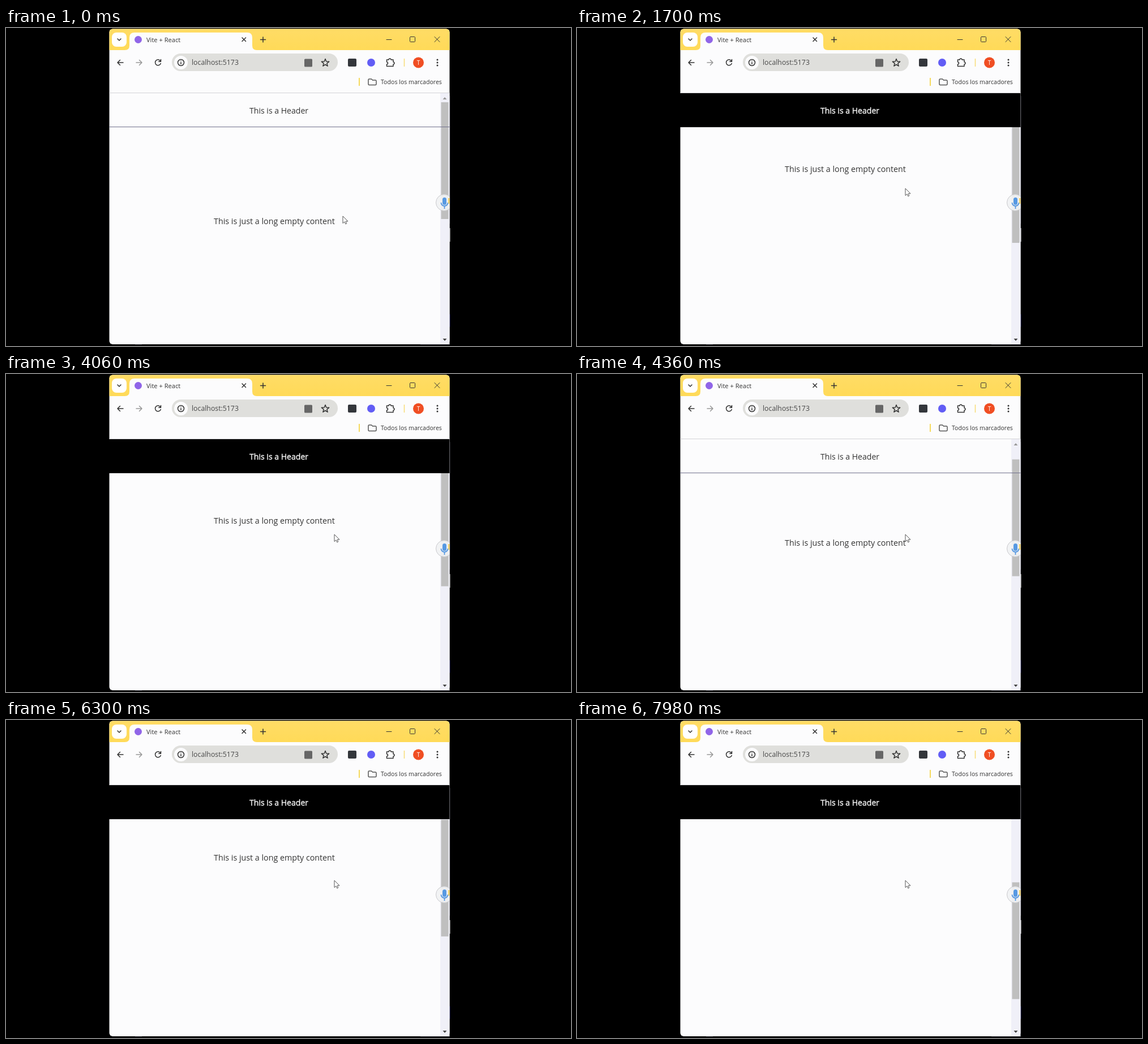
An HTML page for the animation above (8 s loop, 998 by 561 pixels).

```html
<!DOCTYPE html>
<html lang="es">
<head>
<meta charset="utf-8">
<title>Header on scroll</title>
<style>
  html, body { margin: 0; width: 100%; height: 100%; overflow: hidden; background: #000; }
  svg { display: block; width: 100%; height: 100%; }
  text { font-family: "Open Sans", "Noto Sans", sans-serif; fill: #333; }
  .line { fill: none; stroke: #333; stroke-width: 1.5; stroke-linecap: round; stroke-linejoin: round; }
  .thin { stroke-width: 1; }
</style>
</head>
<body>
<svg viewBox="0 0 998 561">
  <defs>
    <linearGradient id="bar" x2="0" y2="1">
      <stop stop-color="#ffdc66"/><stop offset="1" stop-color="#ffda58"/>
    </linearGradient>
    <clipPath id="window"><rect x="182.5" y="1.5" width="601" height="556.5" rx="6"/></clipPath>
    <clipPath id="page"><rect x="182" y="115" width="601.5" height="443"/></clipPath>
  </defs>
  <rect width="998" height="561"/>

  <!-- desktop showing past the window edge -->
  <path d="M784 353v24" stroke="#aaa" stroke-width="1.5"/>
  <path d="M784 120v225M228 558.8h12M732 558.8h52" stroke="#34343c"/>
  <path d="M784 505v22" stroke="#25256a"/>

  <g clip-path="url(#window)">
    <rect x="182" y="1" width="602" height="558" fill="#fcfcfd"/>
    <rect x="182" y="1" width="602" height="38" fill="url(#bar)"/>

    <!-- tab strip -->
    <rect x="187" y="8" width="26" height="25" rx="8" fill="#fff"/>
    <path class="line" d="M197 19l3 3 3-3"/>
    <path d="M210 39q8 0 8-8V17q0-9 9-9h199q9 0 9 9v14q0 8 8 8z" fill="#fcfcfd"/>
    <circle cx="233.500" cy="20.500" r="6.500" fill="#9065e8"/>
    <text x="248" y="25" font-size="11.1">Vite + React</text>
    <path class="line" d="M417 17l6.500 6.500m0-6.500l-6.500 6.500M449.500 20.500h9m-4.500-4.500v9"/>
    <path class="line thin" d="M672 20.500h9M757 15.500l9 9m0-9l-9 9" />
    <rect class="line thin" x="713.500" y="15.500" width="9" height="9" rx="1"/>

    <!-- toolbar -->
    <path class="line" d="M207 61h-10m4.500-4.500L197 61l4.500 4.500"/>
    <path class="line" d="M230 61h10m-4.500-4.500L240 61l-4.500 4.500" style="stroke:#999"/>
    <path class="line" d="M273 58.500a5 5 0 1 0 .3 4M273.500 55.500v3.700h-3.700"/>
    <rect x="293" y="45" width="293" height="31" rx="15.500" fill="#dfdfdc"/>
    <circle cx="309" cy="61" r="12" fill="#fcfcfd"/>
    <circle class="line" cx="309" cy="61" r="5.500"/>
    <path class="line" d="M309 60.500v3M309 58v.1"/>
    <text x="328" y="65.300" font-size="12.3" style="fill:#484848">localhost:5173</text>
    <rect x="527" y="54.500" width="14" height="14" rx="1.500" fill="#666"/>
    <path id="star" class="line"/>
    <rect x="604" y="54" width="15" height="14" rx="2" fill="#33363b"/>
    <circle cx="645" cy="61" r="7" fill="#625df5"/>
    <path class="line" d="M672.500 56h3.500a2 2 0 0 1 4 0h4v4a2 2 0 0 1 0 4v3.500h-11.500v-3.500a2 2 0 0 0 0-4z"/>
    <path d="M703.500 54v14" stroke="#f7dc75" stroke-width="1.500"/>
    <circle cx="728.500" cy="61" r="9.500" fill="#f04e23"/>
    <text x="728.500" y="64.700" font-size="10" text-anchor="middle" style="fill:#fff">T</text>
    <path d="M762 56v.1m0 4.900v.1m0 4.900v.1" stroke="#333" stroke-width="3" stroke-linecap="round"/>

    <!-- bookmarks -->
    <path d="M624 88v14" stroke="#f5d95d" stroke-width="2"/>
    <path class="line" d="M640 91.500q0-1.500 1.500-1.500h4l2 2h5q1.500 0 1.500 1.500v5.500q0 1.500-1.500 1.500h-11q-1.500 0-1.500-1.500z" style="stroke:#555"/>
    <text x="662" y="99.300" font-size="10.6">Todos los marcadores</text>
    <path d="M182 114.500h602" stroke="#d4d4d7"/>
  </g>

  <g clip-path="url(#page)">
    <text id="content" x="367" font-size="14.28">This is just a long empty content</text>
    <rect x="767" y="115" width="17" height="443" fill="#f0f0f8"/>
    <path d="M771.500 126h7l-3.500-4z" fill="#999"/>
    <path d="M771.500 548h7l-3.500 4z" fill="#444"/>
    <rect id="thumb" x="768.500" width="13" height="206" fill="#bfbfbf"/>
    <rect id="header" x="182" y="115" width="602" height="60"/>
    <path id="border" d="M182 174.500h602" stroke="#70708c"/>
    <text id="title" x="430" y="151" font-size="14.07">This is a Header</text>

    <circle cx="774" cy="308" r="14.500" fill="#f1f2f4" fill-opacity=".92" stroke="#c9c9cc"/>
    <path d="M781 300h3v10h-3z" fill="#f3d264"/>
    <rect x="771" y="299" width="7" height="13" rx="3.500" fill="#5799e2"/>
    <path d="M768.500 308a6 6 0 0 0 12 0M774.500 314v5" fill="none" stroke="#5799e2" stroke-width="1.800"/>
  </g>
  <path id="cursor" d="M0 0v12.500l3-2.600 1.800 4 2-.9-1.800-3.900h4z" fill="#fff" stroke="#444" stroke-width=".9"/>
</svg>
<script>
  const LOOP = 8000;
  const HEADER_AT = 80;
  const THUMB_RATIO = 0.457;
  // rows of [time in ms, value]
  const scroll = [
    [0, 0], [1340, 0], [1560, 50], [1700, 92], [2150, 190], [2600, 282], [2680, 285],
    [2860, 285], [3240, 178], [3700, 122], [4060, 82], [4080, 79], [4700, 0],
    [5880, 0], [6180, 66], [6300, 98], [6700, 190], [7300, 290], [7980, 340], [LOOP, 340]
  ];
  const cursorX = [[0, 595], [700, 580], [LOOP, 580]];
  const cursorY = [[0, 332], [700, 283], [LOOP, 283]];

  const $ = id => document.getElementById(id);
  const [content, thumb, header, border, title, cursor] =
    ["content", "thumb", "header", "border", "title", "cursor"].map($);

  function valueAt(steps, t) {
    const i = steps.findIndex(step => step[0] > t);
    const [t0, v0] = steps[i - 1], [t1, v1] = steps[i];
    return v0 + (v1 - v0) * (t - t0) / (t1 - t0);
  }

  function starPath(cx, cy, outer, inner) {
    const points = Array.from({ length: 10 }, (_, i) => {
      const r = i % 2 ? inner : outer, a = (i / 5 - 0.5) * Math.PI;
      return `${cx + r * Math.cos(a)} ${cy + r * Math.sin(a)}`;
    });
    return `M${points.join("L")}z`;
  }

  function draw(t) {
    const y = Math.round(valueAt(scroll, t));
    const dark = y > HEADER_AT;
    content.setAttribute("y", 346 - y);
    thumb.setAttribute("y", 131 + y * THUMB_RATIO);
    header.style.display = dark ? "" : "none";
    border.style.display = dark ? "none" : "";
    title.style.fill = dark ? "#f4f4f4" : "#333";
    title.style.stroke = dark ? "#f4f4f4" : "none";
    title.style.strokeWidth = 0.4;
    cursor.setAttribute("transform", `translate(${valueAt(cursorX, t)} ${valueAt(cursorY, t)})`);
  }

  function tick() {
    draw(performance.now() % LOOP);
    requestAnimationFrame(tick);
  }

  $("star").setAttribute("d", starPath(564, 61.5, 7, 3));
  draw(0);
  requestAnimationFrame(tick);
</script>
</body>
</html>
```
